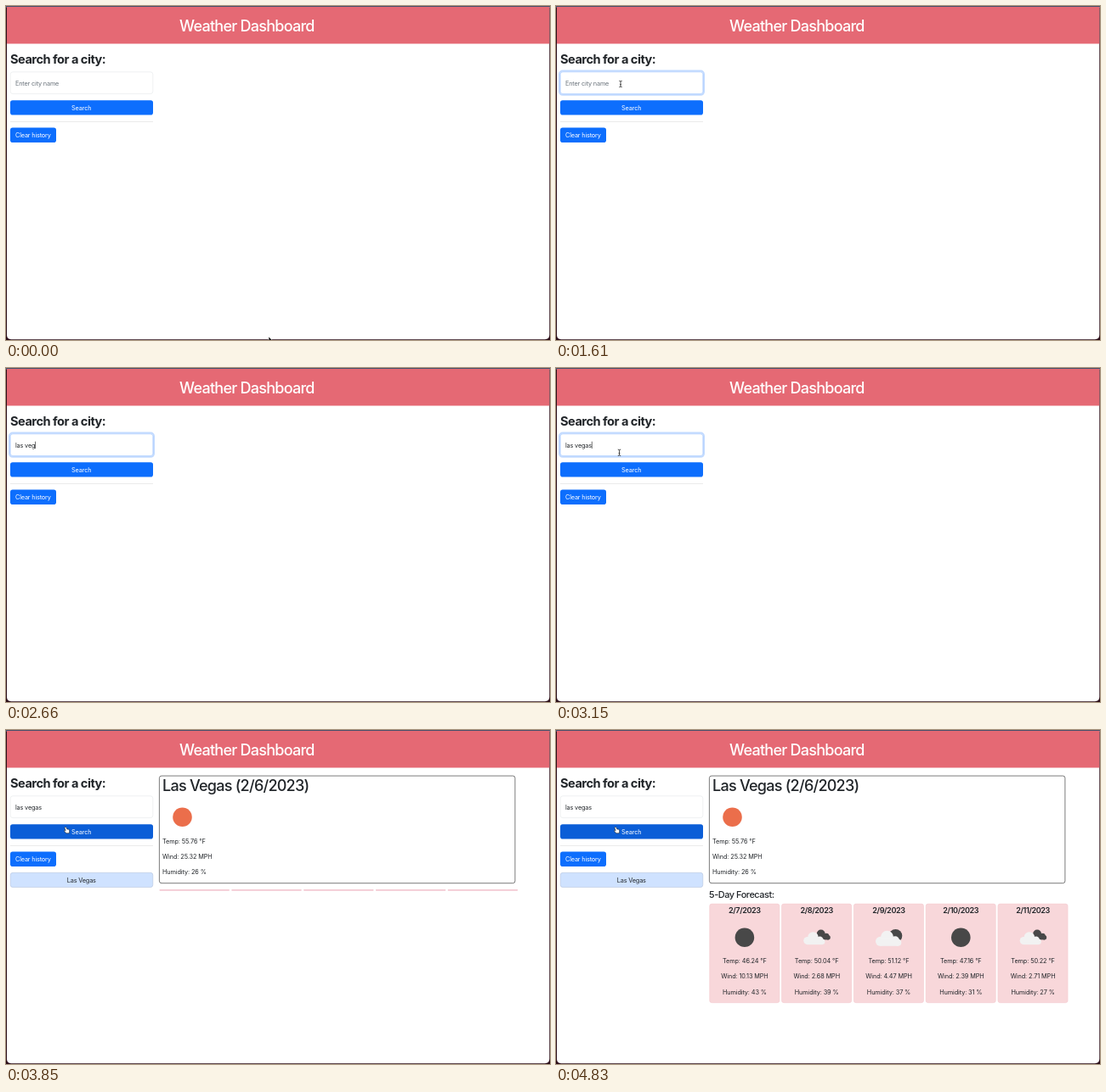
Animation of 640 by 394 pixels, one loop 4900 ms. Source, as an HTML page:

```html
<!DOCTYPE html>
<html lang="en">
<head>
<meta charset="utf-8">
<title>Weather Dashboard</title>
<style>
  html, body { margin: 0; width: 100%; height: 100%; overflow: hidden; background: #1c1016; }
  svg { display: block; width: 100vw; height: 100vh; }
  text { font: 7.3px Inter, "Liberation Sans", sans-serif; letter-spacing: -.1px; fill: #212529; white-space: pre; }
  .title { font-size: 18px; font-weight: 500; letter-spacing: -.74px; }
  .heading { font-size: 14.6px; font-weight: 700; letter-spacing: -.5px; }
  .subheading { font-size: 10.9px; font-weight: 500; letter-spacing: -.43px; }
  .date { font-size: 9.1px; font-weight: 600; letter-spacing: -.4px; }
  .control { letter-spacing: -.17px; }
  .light { fill: #fff; }
  .mid { text-anchor: middle; }
</style>
</head>
<body>
<svg id="stage" viewBox="0 0 640 394" preserveAspectRatio="none">
  <defs>
    <g id="cloud">
      <circle cx="-9.5" cy="4.5" r="5.5"/>
      <circle cx="-1.5" cy="-.5" r="7.5"/>
      <circle cx="8" cy="3.5" r="5"/>
      <circle cx="11.3" cy="6" r="4"/>
      <rect x="-10" y="2" width="22" height="8"/>
    </g>
    <g id="clear"><circle r="11.3" fill="#484848"/></g>
    <g id="broken">
      <use href="#cloud" transform="translate(6 -4) scale(.66)" fill="#484848"/>
      <use href="#cloud" transform="translate(-3 0) scale(.83)" fill="#f2f2f2"/>
    </g>
    <g id="few">
      <circle cx="8" cy="-2" r="7.8" fill="#484848"/>
      <use href="#cloud" transform="translate(-.5 0)" fill="#f2f2f2"/>
    </g>
  </defs>

  <rect width="640" height="394" fill="#2b0d18"/>
  <rect width="640" height="2" fill="#47506b"/>
  <path d="M1 1H639.3V388Q639.3 393.2 634 393.2H6Q1 393.2 1 388Z" fill="#fff"/>
  <rect x="1" y="1" width="638.3" height="43.5" fill="#e56974"/>
  <text class="title light" x="204" y="29.7">Weather Dashboard</text>

  <text class="heading" x="5" y="68.4">Search for a city:</text>
  <rect id="ring" x="4" y="76.6" width="170" height="28.2" rx="3.8" fill="none" stroke="#0d6efd" stroke-opacity=".25" stroke-width="2"/>
  <rect id="field" x="5.2" y="77.8" width="167.6" height="25.8" rx="2.8" fill="#fff" stroke-width=".5"/>
  <text id="entry" class="control" x="11" y="93.6"></text>
  <rect id="caret" y="86.7" width=".6" height="8.4" fill="#111"/>
  <rect id="search" x="5" y="111.2" width="168" height="17.4" rx="2.8"/>
  <text class="control light mid" x="88.7" y="122.6">Search</text>
  <rect x="5" y="136.3" width="168" height=".5" fill="#d4d4d4"/>
  <rect id="clearButton" x="5" y="143.6" width="54" height="17.4" rx="2.8"/>
  <text class="control light" x="11" y="155">Clear history</text>

  <g id="result">
    <rect x="5.2" y="168.3" width="167.6" height="17.2" rx="2.8" fill="#cfe2ff" stroke="#aebdd6" stroke-width=".5"/>
    <text class="control mid" x="88.8" y="179.5">Las Vegas</text>
    <rect x="180.4" y="54.1" width="418.5" height="126.6" rx="2.6" fill="#fff" stroke="#444" stroke-width=".7"/>
    <text class="title" x="184" y="72.2">Las Vegas (2/6/2023)</text>
    <circle cx="207.5" cy="102.8" r="11.3" fill="#eb6e4b"/>
    <text x="184" y="133.5">Temp: 55.76 °F</text>
    <text x="184" y="151.8">Wind: 25.32 MPH</text>
    <text x="184" y="170.1">Humidity: 26 %</text>
  </g>
  <g id="emptyCards"></g>
  <g id="forecast">
    <text class="subheading" x="180" y="198.4">5-Day Forecast:</text>
  </g>

  <g id="pointer" stroke-linejoin="round">
    <path id="arrow" d="M0 0V8L1.9 6.3L3.2 9.3L4.5 8.7L3.2 5.8H5.8Z" fill="#111" stroke="#fff" stroke-width=".5"/>
    <path id="beam" d="M-1.7-3.7Q0-3.7 0-2.6Q0-3.7 1.7-3.7M0-2.6V2.6M-1.7 3.7Q0 3.7 0 2.6Q0 3.7 1.7 3.7M-.8 .7H.8" fill="none" stroke="#222" stroke-width=".8"/>
    <path id="hand" d="M-1.6-3.4Q-.7-4 0-2.9L.8-1L2.7-.7Q3.8-.3 3.7 1L3.3 3.8H-.3L-2.3 1.2Q-2.7 .2-1.4 .3L-.8 .8L-2-2.5Z" fill="#fff" stroke="#222" stroke-width=".6"/>
  </g>
</svg>
<script>
const LOOP = 4900, STEP = 70;
const $ = id => document.getElementById(id);
const set = (id, attrs) => Object.entries(attrs).forEach(([k, v]) => $(id).setAttribute(k, v));
const show = (id, on) => set(id, { visibility: on ? "visible" : "hidden" });
const clamp = v => Math.max(0, Math.min(1, v));
const smooth = v => v * v * (3 - 2 * v);

const query = "las vegas";
const keyTimes = [1890, 1960, 2100, 2170, 2380, 2450, 2590, 2730, 2870];
const focusAt = 1190, blurAt = 3640, resultAt = 3780, forecastAt = 3920;

// time, x, y of the pointer
const path = [[70, 309, 390], [910, 73, 91], [980, 73, 91], [1190, 76, 92], [2990, 76, 92], [3430, 71, 118]];

const days = [
  ["2/7/2023", "clear", "46.24", "10.13", 43],
  ["2/8/2023", "broken", "50.04", "2.68", 39],
  ["2/9/2023", "few", "51.12", "4.47", 37],
  ["2/10/2023", "clear", "47.16", "2.39", 31],
  ["2/11/2023", "broken", "50.22", "2.71", 27]
];

days.forEach(([date, icon, temp, wind, humidity], i) => {
  const x = 180.5 + i * 84.8;
  const line = (y, text, style = "") => `<text class="mid ${style}" x="41.4" y="${y}">${text}</text>`;
  $("emptyCards").innerHTML += `<rect x="${x}" y="188.1" width="82.4" height="1.6" rx=".6" fill="#f3c9d2"/>`;
  $("forecast").innerHTML += `<g transform="translate(${x} 0)">
    <rect x=".2" y="205.1" width="82.2" height="116.6" rx="2.6" fill="#f8d7da" stroke="#f3c6cc" stroke-width=".5"/>
    ${line(215.5, date, "date")}
    <use href="#${icon}" x="41.4" y="244.8"/>
    ${line(275, `Temp: ${temp} °F`)}
    ${line(293.4, `Wind: ${wind} MPH`)}
    ${line(311.7, `Humidity: ${humidity} %`)}
  </g>`;
});

function pointerAt(t) {
  const next = path.findIndex(p => p[0] > t);
  if (next === 0) return path[0].slice(1);
  if (next < 0) return path[path.length - 1].slice(1);
  const [t0, x0, y0] = path[next - 1], [t1, x1, y1] = path[next];
  const k = smooth((t - t0) / (t1 - t0));
  return [x0 + (x1 - x0) * k, y0 + (y1 - y0) * k];
}

function drawPointer(t) {
  const [x, y] = pointerAt(t);
  const inside = (left, top, right, bottom) => x > left && x < right && y > top && y < bottom;
  const onField = inside(5, 77, 173, 104);
  const onSearch = inside(5, 111, 173, 129);
  const onClear = inside(5, 143, 59, 161);
  const visible = t < keyTimes[0] || t >= 2990;
  set("pointer", { transform: `translate(${x} ${y})` });
  show("beam", visible && onField);
  show("hand", visible && (onSearch || onClear));
  show("arrow", visible && !onField && !onSearch && !onClear);
  set("search", { fill: onSearch ? "#0b5ed7" : "#0d6efd" });
  set("clearButton", { fill: onClear ? "#0b5ed7" : "#0d6efd" });
}

function drawField(t) {
  const count = keyTimes.filter(k => k <= t).length;
  const focused = t >= focusAt && t < blurAt;
  const glow = clamp((t - focusAt + STEP) / 150) * (1 - clamp((t - blurAt) / 150));
  set("ring", { opacity: glow });
  set("field", { stroke: glow > .4 ? "#86b7fe" : "#dfe2e5" });
  $("entry").textContent = count ? query.slice(0, count) : "Enter city name";
  $("entry").style.fill = count ? "#212529" : "#6c757d";
  const blinkFrom = count ? keyTimes[count - 1] : focusAt;
  show("caret", focused && (t - blinkFrom) % 1000 < 420);
  set("caret", { x: 11 + (count ? $("entry").getComputedTextLength() : 0) });
}

function draw(t) {
  drawPointer(t);
  drawField(t);
  show("result", t >= resultAt);
  show("emptyCards", t >= resultAt && t < forecastAt);
  show("forecast", t >= forecastAt);
}

const start = performance.now();
function tick() {
  const t = (performance.now() - start) % LOOP;
  draw(Math.floor(t / STEP) * STEP);
  requestAnimationFrame(tick);
}
tick();
</script>
</body>
</html>
```
